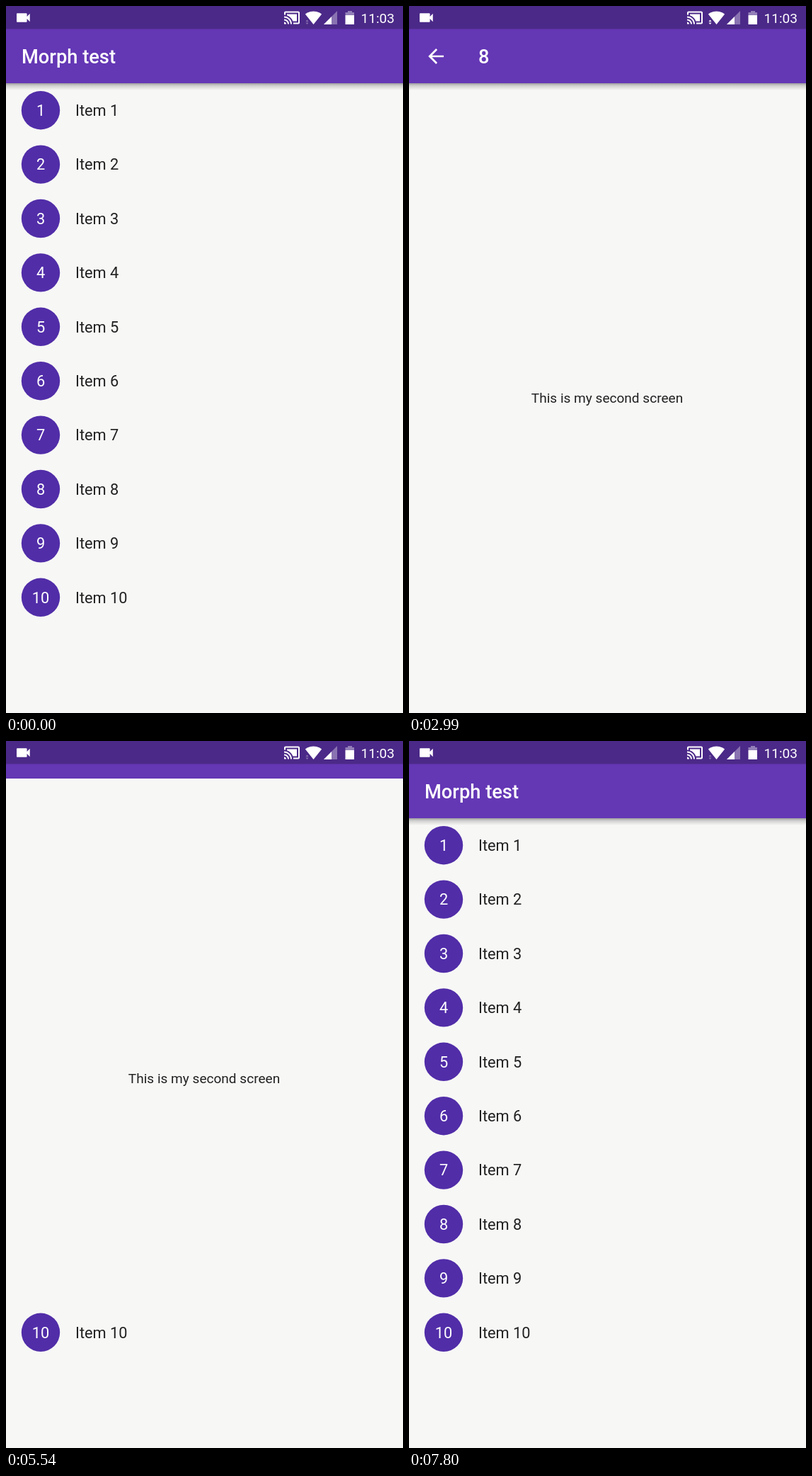
An HTML page with a canvas for the animation above (7.99 s loop, 561 by 998 pixels).

```html
<!DOCTYPE html>
<html lang="en">
<head>
<meta charset="utf-8">
<title>Morph test</title>
<style>
html, body { margin: 0; width: 100%; height: 100%; overflow: hidden; background: #f7f7f6; }
canvas { display: block; width: 561px; height: 998px; }
</style>
</head>
<body>
<canvas id="stage" width="561" height="998"></canvas>
<script>
const ctx = document.getElementById('stage').getContext('2d');
const W = 561, H = 998, LOOP = 7990;
const DP = W / 411.75;
const BAR = 109, ROW = 76.4, STATUS = 32.5;
const BACK = '#f7f7f6', PURPLE = '#6437b5', DARK = '#512da8', INK = '#212121';

const visits = [
  { item: 8, open: 1130, close: 2990 },
  { item: 2, open: 5050, close: 6910 }
];
const STEP = 48.75, MORPH = 860, LEAD = 58, LAG = 24;
const START_H = 60, START_SHIFT = -2.3;

const icons = {
  back: new Path2D('M20 11H7.83l5.59-5.59L12 4l-8 8 8 8 1.41-1.41L7.83 13H20v-2z'),
  camera: new Path2D('M17 10.5V7c0-.55-.45-1-1-1H4c-.55 0-1 .45-1 1v10c0 .55.45 1 1 1h12c.55 0 1-.45 1-1v-3.5l4 4v-11l-4 4z'),
  cast: new Path2D('M1 18v3h3c0-1.66-1.34-3-3-3zm0-4v2c2.76 0 5 2.24 5 5h2c0-3.87-3.13-7-7-7zm18-7H5v1.63c3.96 1.28 7.09 4.41 8.37 8.37H19V7zM1 10v2c4.97 0 9 4.03 9 9h2c0-6.08-4.93-11-11-11zm20-7H3c-1.1 0-2 .9-2 2v3h2V5h18v14h-7v2h7c1.1 0 2-.9 2-2V5c0-1.1-.9-2-2-2z'),
  wifi: new Path2D('M12 21.5L23.64 7c-.45-.34-4.93-4-11.64-4C5.28 3 .81 6.66.36 7z')
};

function icon(name, x, y, scale) {
  ctx.save();
  ctx.translate(x, y);
  ctx.scale(scale, scale);
  ctx.fill(icons[name]);
  ctx.restore();
}

function text(str, x, y, dp, color, weight = 400, align = 'left') {
  ctx.font = `${weight} ${dp * DP}px Roboto, sans-serif`;
  ctx.textAlign = align;
  ctx.fillStyle = color;
  ctx.fillText(str, x, y);
}

function rect(x, y, w, h, color) {
  ctx.fillStyle = color;
  ctx.fillRect(x, y, w, h);
}

function poly(color, ...pts) {
  ctx.fillStyle = color;
  ctx.beginPath();
  for (let i = 0; i < pts.length; i += 2) ctx.lineTo(pts[i], pts[i + 1]);
  ctx.fill();
}

const rowMid = n => BAR + ROW * (n - 0.5);
const mix = (a, b, p) => a + (b - a) * p;
const clamp = x => Math.min(1, Math.max(0, x));

// Cubic Bezier (.42, 0, .58, 1), solved by bisection
function ease(x) {
  let lo = 0, hi = 1, s = x;
  for (let i = 0; i < 24; i++) {
    s = (lo + hi) / 2;
    const r = 1 - s;
    const bx = 1.26 * r * r * s + 1.74 * r * s * s + s * s * s;
    if (bx < x) lo = s; else hi = s;
  }
  return s * s * (3 - 2 * s);
}

const snap = ms => Math.floor((ms + 2) / STEP) * STEP;

// Linear progress of the morph: 0 is the list, 1 the full page
function morphAt(t) {
  const v = visits.findLast(v => t >= v.open);
  if (!v) return null;
  const x = t < v.close
    ? (snap(t - v.open) + LEAD) / MORPH
    : 1 - (snap(t - v.close) - LAG) / MORPH;
  return { item: v.item, x: clamp(x) };
}

function appBar() {
  const g = ctx.createLinearGradient(0, BAR, 0, BAR + 10);
  g.addColorStop(0, 'rgba(0,0,0,.36)');
  g.addColorStop(0.35, 'rgba(0,0,0,.16)');
  g.addColorStop(1, 'rgba(0,0,0,0)');
  rect(0, BAR, W, 10, g);
  rect(0, 0, W, BAR, PURPLE);
}

function listPage() {
  rect(0, 0, W, H, BACK);
  for (let n = 1; n <= 10; n++) {
    const y = rowMid(n), base = Math.round(y + 7.8);
    ctx.fillStyle = DARK;
    ctx.beginPath();
    ctx.arc(49, y, 27.2, 0, Math.PI * 2);
    ctx.fill();
    text(n, 49, base, 16, '#fff', 400, 'center');
    text('Item ' + n, 98, base, 16, INK);
  }
  appBar();
  text('Morph test', 22, 81, 20, '#fff', 500);
}

function detailPage(item) {
  rect(0, 0, W, H, BACK);
  appBar();
  ctx.fillStyle = '#fff';
  icon('back', 38.15 - 12 * DP, 71 - 12 * DP, DP);
  text(item, 98, 81, 20, '#fff', 500);
  text('This is my second screen', 280, 560, 14, INK, 400, 'center');
}

function morphPage({ item, x }) {
  const p = ease(x);
  const mid = mix(rowMid(item) + START_SHIFT, H / 2, p);
  const h = mix(START_H, H, p);
  const top = Math.round(mid - h / 2), bottom = Math.round(mid + h / 2);
  // Full-size page centred on the growing window
  ctx.save();
  ctx.globalAlpha = clamp((x - 0.07) / 0.09);
  ctx.beginPath();
  ctx.rect(0, top, W, bottom - top);
  ctx.clip();
  ctx.translate(0, Math.round(mid - H / 2));
  detailPage(item);
  ctx.restore();
}

function statusBar(t) {
  rect(0, 0, W, STATUS, 'rgba(0,0,0,.25)');
  ctx.fillStyle = '#fff';
  icon('camera', 11.9, 4, 1.04);
  icon('cast', 392, 4.5, 1);
  icon('wifi', 422.5, 4.5, 1);
  const busy = (t >= 980 && t < 3970) || (t >= 5880 && t < 7750);
  const mark = busy ? '#fff' : 'rgba(255,255,255,.35)';
  poly(mark, 423.5, 22, 427.5, 22, 425.5, 19.5);
  poly(mark, 423.5, 23.5, 427.5, 23.5, 425.5, 26);
  poly('rgba(255,255,255,.35)', 449, 26, 468, 26, 468, 7);
  poly('#fff', 449, 26, 460, 26, 460, 15);
  rect(483, 7, 6, 2, 'rgba(255,255,255,.4)');
  rect(479.5, 9, 12.5, 4, 'rgba(255,255,255,.4)');
  rect(479.5, 13, 12.5, 13, '#fff');
  text('11:03', 501.5, 24, 14, '#fff');
}

function draw(t) {
  listPage();
  const m = morphAt(t);
  if (m && m.x > 0) morphPage(m);
  statusBar(t);
}

const began = performance.now();
function tick() {
  draw((performance.now() - began) % LOOP);
  requestAnimationFrame(tick);
}
tick();
</script>
</body>
</html>
```
